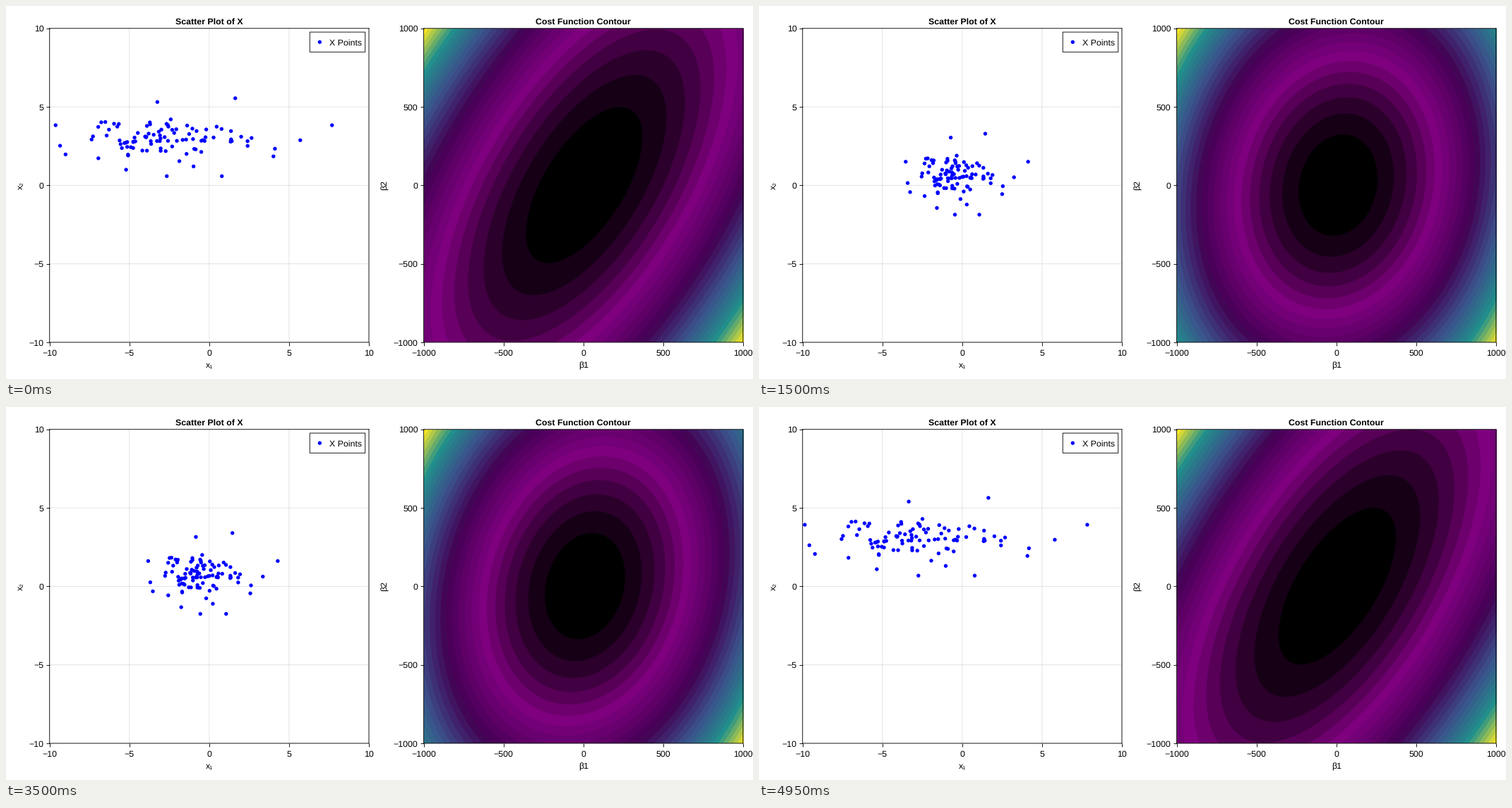
A matplotlib script for the animation above (5 s loop, 1058x529 px).

```python
import numpy as np
import matplotlib.pyplot as plt
from matplotlib.animation import FuncAnimation
from matplotlib.colors import LinearSegmentedColormap
from matplotlib.patches import Rectangle

DPI = 100
W, H = 1200, 600            # layout units, scaled to 1058 x 529 pixels
UNIT = 1058 / W * 72 / DPI  # one layout unit in points
TOP, BOTTOM, SIDE = 36, 541, 513
FRAMES, BANDS = 100, 30

plt.rcParams.update({
    "font.family": ["Liberation Sans", "DejaVu Sans"],
    "font.size": 14 * UNIT,
    "text.hinting": "none",
})

fig = plt.figure(figsize=(10.58, 5.29), dpi=DPI, facecolor="white")


def write(x, y, s, **kw):
    kw = {"ha": "center", "va": "baseline", "color": "black", **kw}
    fig.text(x / W, 1 - y / H, s, **kw)


def panel(left, lim, title, xlabel, ylabel, ylabel_x):
    height = BOTTOM - TOP
    ax = fig.add_axes([left / W, 1 - BOTTOM / H, SIDE / W, height / H])
    ticks = np.linspace(-lim, lim, 5)
    ax.set(xlim=(-lim, lim), ylim=(-lim, lim), xticks=ticks, yticks=ticks)
    ax.tick_params(length=6 * UNIT, width=UNIT, labelbottom=False, labelleft=False)
    ax.set_axisbelow(True)
    for spine in ax.spines.values():
        spine.set(linewidth=UNIT, snap=False)
    for k, v in enumerate(ticks):
        text = f"{v:.0f}".replace("-", "\u2212")
        write(left + SIDE * k / 4, 562, text)
        write(left - 9, BOTTOM - height * k / 4 + 5, text, ha="right")
    write(left + SIDE / 2, 29, title, weight="bold")
    write(left + SIDE / 2, 582, xlabel)
    write(ylabel_x, (TOP + BOTTOM) / 2, ylabel, rotation=90, va="center")
    return ax


ax1 = panel(70, 10, "Scatter Plot of X", "x\u2081", "x\u2082", 24)
ax2 = panel(671, 1000, "Cost Function Contour", "\u03b21", "\u03b22", 609)
ax1.grid(color="black", alpha=0.12, linewidth=UNIT, snap=False)

# Sample statistics of the unscaled data
MEAN = np.array([-2.81, 2.97])
STD = np.array([3.176, 0.953])
RHO = 0.03


def blend(i):
    """Weight of the standardised data, and the resulting mean and spread."""
    s = np.sin(np.pi * (i + 1) / FRAMES)
    return s, (1 - s) * MEAN, (1 - s) * STD + s


# Standardised sample: a random core and a few outliers
core = np.random.default_rng(4).normal([-0.1, 0.05], 0.85, (200, 2))
core = core[np.hypot(*core.T) < 1.9][:88]
outliers = [(3.35, 1.0), (2.71, 0), (2.2, -0.57), (2.17, -1.08), (1.4, 2.8), (-2.22, 1.0),
            (-2.13, -0.37), (-2.02, -0.95), (-0.17, 2.55), (1.13, -2.4), (0.02, -2.4),
            (-0.8, -1.97)]
z = np.vstack([core, outliers])

DOT = dict(s=(6.1 * UNIT) ** 2, color="blue", edgecolors="none")
dots = ax1.scatter(*z.T, zorder=3, **DOT)

# Legend, on an overlay in layout units
over = fig.add_axes([0, 0, 1, 1], xlim=(0, W), ylim=(H, 0))
over.axis("off")
over.add_patch(Rectangle((488, 42), 89, 32, fc="white", ec="black", lw=UNIT, snap=False))
over.scatter([504], [58], zorder=3, **DOT)
write(519, 63, "X Points", ha="left")

colors = ["black", "purple", "#440154", "#3b528b", "#21918c", "#fde725"]
cmap = LinearSegmentedColormap.from_list("cost", colors, N=1024)
palette = cmap(np.linspace(0, 1, BANDS))[:, :3].astype(np.float32)

# Two samples per pixel for smooth band edges
NX, NY = 452, 445
b1 = ((np.arange(2 * NX) + 0.5) / NX - 1)[None, :]
b2 = (1 - (np.arange(2 * NY) + 0.5) / NY)[:, None]
img = ax2.imshow(np.zeros((NY, NX, 3)), extent=(-1000, 1000, -1000, 1000),
                 aspect="auto", interpolation="bilinear")


def contour(i):
    s, m, d = blend(i)
    sxx, syy = m ** 2 + d ** 2
    sxy = m[0] * m[1] + RHO * d[0] * d[1]
    u = b1 - 0.001 * (2 + 8 * s * s)
    cost = sxx * u ** 2 + 2 * sxy * u * b2 + syy * b2 ** 2
    band = np.minimum((cost * (BANDS / cost.max())).astype(int), BANDS - 1)
    return palette[band].reshape(NY, 2, NX, 2, 3).mean(axis=(1, 3))


def update(i):
    _, m, d = blend(i)
    dots.set_offsets(m + d * z)
    img.set_data(np.clip(contour(i), 0, 1))
    return dots, img


anim = FuncAnimation(fig, update, frames=FRAMES, interval=50, repeat=True,
                     repeat_delay=0, blit=False)
plt.show()
```
